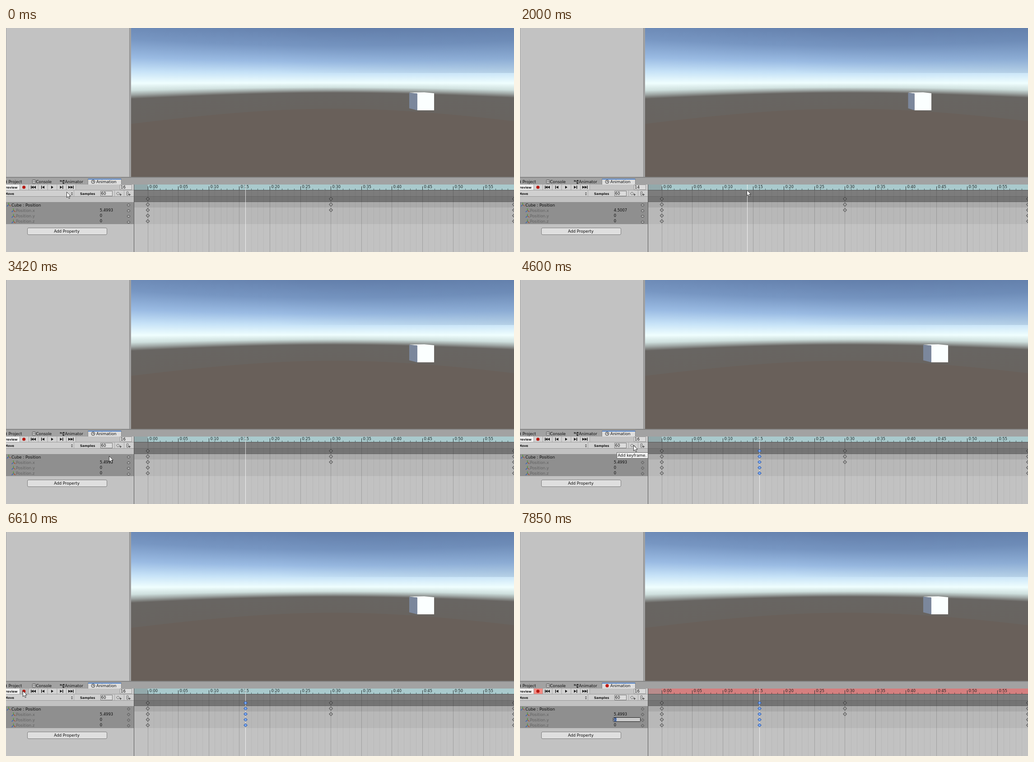
An HTML page with a canvas for the animation above (8 s loop, 1125 by 498 pixels).

```html
<!DOCTYPE html>
<html lang="en">
<head>
<meta charset="utf-8">
<title>Keyframe editor</title>
<style>
  html, body { margin: 0; width: 100%; height: 100%; overflow: hidden; background: #c2c2c2; }
  canvas { display: block; }
</style>
</head>
<body>
<canvas id="stage" width="1125" height="498"></canvas>
<script>
const W = 1125, H = 498, LOOP = 8000;
const stage = document.getElementById('stage');
let g = stage.getContext('2d');

const SANS = '"DejaVu Sans", sans-serif';
const ROWS = Array.from({ length: 5 }, (_, i) => 380 + 12.4 * i);
const frameX = f => 314 + 13.52 * f;

const TICK = 132;
const stepped = t => Math.floor((t + 20) / TICK) * TICK;

const DRAG = [1700, 2900];
const KEY_ADDED = 4480, TIP_ON = 4600, TIP_OFF = 5670;
const REC_PRESS = 6610, REC_ON = 6730, EDIT_ON = 7700, EDIT_SETTLED = 7850;
const POINTER_OFF = 7240;

// Stops of the pointer: time, x, y
const STOPS = [
  [0, 134, 364], [270, 242, 366], [420, 187, 380], [660, 554, 387], [810, 582, 363],
  [1200, 527, 360], [1700, 531, 360], [2120, 492, 360], [2360, 517, 360], [2780, 531, 360],
  [2930, 531, 360], [3420, 228, 391], [3690, 165, 356], [4080, 251, 367], [5000, 251, 367],
  [5520, 208, 396], [5670, 205, 401], [6330, 37, 353], [6610, 37, 353], [7130, 202, 405]
];

const smooth = u => u * u * (3 - 2 * u);

function pointerAt(t) {
  const i = STOPS.findIndex(s => s[0] > t);
  if (i < 1) return STOPS[STOPS.length - 1].slice(1);
  const [t0, x0, y0] = STOPS[i - 1], [t1, x1, y1] = STOPS[i];
  const u = smooth((t - t0) / (t1 - t0));
  return [x0 + (x1 - x0) * u, y0 + (y1 - y0) * u];
}

function rect(x, y, w, h, color) {
  g.fillStyle = color;
  g.fillRect(x, y, w, h);
}

function box(x, y, w, h, fill, edge, r = 0) {
  g.beginPath();
  g.roundRect(x + .5, y + .5, w - 1, h - 1, r);
  g.fillStyle = fill;
  g.fill();
  g.strokeStyle = edge;
  g.lineWidth = 1;
  g.stroke();
}

function poly(points, fill, edge, width = 1) {
  g.beginPath();
  points.forEach(([x, y]) => g.lineTo(x, y));
  g.closePath();
  if (fill) { g.fillStyle = fill; g.fill(); }
  if (edge) { g.strokeStyle = edge; g.lineWidth = width; g.stroke(); }
}

function line(x1, y1, x2, y2, color, width = 1) {
  g.beginPath();
  g.moveTo(x1, y1);
  g.lineTo(x2, y2);
  g.strokeStyle = color;
  g.lineWidth = width;
  g.stroke();
}

function dot(x, y, r, fill, edge) {
  g.beginPath();
  g.arc(x, y, r, 0, Math.PI * 2);
  g.fillStyle = fill;
  g.fill();
  if (edge) { g.strokeStyle = edge; g.lineWidth = 1; g.stroke(); }
}

function text(str, x, y, size = 8.75, color = '#0c0c0c', weight = '', align = 'left') {
  g.font = `${weight} ${size}px ${SANS}`;
  g.textAlign = align;
  g.fillStyle = color;
  g.fillText(str, x, y);
}

const mini = (str, x, y, align) => text(str, x, y, 7, '#111', 'bold', align);

function diamond(x, y, r, fill, edge) {
  poly([[x, y - r], [x + r, y], [x, y + r], [x - r, y]], fill, edge);
}

function gradient(x, y, stops) {
  const ramp = g.createLinearGradient(0, 0, x, y);
  stops.forEach(([at, color]) => ramp.addColorStop(at / (x || y), color));
  return ramp;
}

// Lines of equal elevation bend away from eye level, less so in the sky
function drawScene() {
  const level = 120, cx = 725.5, focal = 372, left = 277, depth = 340;
  const ramp = gradient(0, depth, [
    [0, '#6581ad'], [40, '#7796c2'], [75, '#9abbe3'], [100, '#c6e2f7'], [122, '#effefe'],
    [132, '#cfe0de'], [138, '#a0a8a6'], [144, '#686562'], [179, '#686460'],
    [179.8, '#69605a'], [depth, '#69605a']
  ]);
  g.save();
  g.beginPath();
  g.rect(left, 0, W - left, 331);
  g.clip();
  g.fillStyle = ramp;
  for (let x = left; x < W; x++) {
    const bend = Math.hypot(1, (x - cx) / focal);
    const halves = [[0, level, 1 + (bend - 1) * .35], [level, depth - level, bend]];
    for (const [y, h, s] of halves) {
      g.setTransform(1, 0, 0, s, 0, level * (1 - s));
      g.fillRect(x, y, 1, h);
    }
  }
  g.resetTransform();
  g.globalAlpha = .14;
  g.fillStyle = gradient(W, 0, [[600, 'rgba(50,75,115,0)'], [W, 'rgb(50,75,115)']]);
  g.fillRect(600, 0, W - 600, 100);
  g.restore();
}

function axes(x, y) {
  line(x, y, x, y - 4.5, '#4f9a2c', 1.4);
  line(x, y, x + 4.5, y + 3, '#a8502e', 1.4);
  line(x, y, x - 4, y + 3.5, '#2f62b8', 1.4);
}

function transportIcons() {
  const c = '#161616', y = 354;
  const tri = (x, dir) => poly([[x, y - 3.3], [x + 5 * dir, y], [x, y + 3.3]], c);
  const bar = x => rect(x, y - 3.5, 1.5, 7, c);
  bar(55); tri(61, -1); tri(66, -1);
  bar(78); tri(85, -1);
  tri(100, 1);
  tri(119.5, 1); bar(125);
  tri(138, 1); tri(143, 1); bar(148);
}

function drawTabs() {
  rect(0, 333, W, 15, '#a2a2a2');
  rect(182, 336, 73, 12, '#dedede');
  rect(182, 335, 73, 2, '#4c7fc9');
  line(181.5, 335, 181.5, 348, '#838383');
  line(255.5, 335, 255.5, 348, '#838383');
  rect(0, 339, 2, 6, '#555');
  text('Project', 5.5, 345.3);
  box(58, 337, 8, 9, '#ddd', '#444', 1);
  line(60, 340, 64.5, 340, '#444');
  line(60, 342.5, 64.5, 342.5, '#444');
  text('Console', 66.5, 345.3);
  line(121, 340, 128, 340, '#333');
  line(123, 340, 127, 344.5, '#333');
  rect(119.5, 338.5, 3, 3, '#333');
  rect(126, 338, 3.5, 3.5, '#333');
  rect(125.5, 343, 3.5, 3.5, '#333');
  text('Animator', 130.5, 345.3);
  text('Animation', 200, 345.3);
}

function drawToolbar() {
  rect(0, 348, 284, 13, '#d2d2d2');
  rect(0, 348, 30, 13, '#f1f1f1');
  rect(155, 348, 97, 13, '#c4c4c4');
  line(30.5, 348, 30.5, 361, '#a4a4a4');
  for (let x = 50.5; x < 160; x += 20.8) line(x, 348, x, 361, '#a4a4a4');
  line(0, 360.5, 284, 360.5, '#9a9a9a');
  mini('Preview', 25.5, 357, 'right');
  transportIcons();
  box(252, 348, 27, 12, '#dadada', '#989898');

  rect(0, 361, 284, 14, '#d0d0d0');
  for (const x of [150.5, 240.5, 261.5]) line(x, 361, x, 375, '#aaa');
  line(0, 374.5, 284, 374.5, '#989898');
  mini('Move', 18, 371, 'right');
  poly([[144, 367.5], [146, 365], [148, 367.5]], '#444');
  poly([[144, 369.5], [146, 372], [148, 369.5]], '#444');
  mini('Samples', 164, 371);
  box(209, 362, 27, 12, '#dcdcdc', '#7b7b7b');
  text('60', 210.5, 371, 8.5);
  diamond(248, 368, 3.4, '#ddd', '#555');
  box(267, 363, 4, 10, '#ddd', '#555', 1);
  for (const x of [253.5, 273.5]) {
    line(x - 2.5, 370.5, x + 2.5, 370.5, '#333');
    line(x, 368, x, 373, '#333');
  }
}

function drawProperties() {
  rect(0, 387, 284, 49, '#8f8f8f');
  axes(6, 393);
  text('Cube : Position', 12, 396.7);
  ['x', 'y', 'z'].forEach((axis, i) => {
    const y = 408.7 + i * 12.3;
    axes(16.5, y - 3);
    text('Position.' + axis, 22, y, 8.75, '#626262');
  });
  box(47, 444, 177, 16, '#dfdfdf', '#7c7c7c', 2.5);
  text('Add Property', 134.5, 455, 8.75, '#0c0c0c', '', 'center');
}

function drawSheet() {
  rect(284, 361, 841, 137, '#c2c2c2');
  rect(284, 387, 841, 49, '#b8b8b8');
  rect(284, 387, 841, 12, '#aaaaaa');
  rect(284, 361, 841, 13, '#7c7c7c');
  rect(284, 374, 841, 13, '#747474');
  line(284, 374.5, W, 374.5, '#686868');
  line(284, 386.5, W, 386.5, '#666');
  for (let f = 0; f < 60; f++) {
    const x = Math.floor(frameX(f)) + .5;
    line(x, 361, x, H, f % 5 ? 'rgba(0,0,0,.05)' : 'rgba(0,0,0,.18)');
  }
}

function drawRuler(recording) {
  rect(284, 348, 841, 12, recording ? '#d57f7f' : '#a9cacd');
  rect(284, 348, 30, 12, recording ? '#b98c8c' : '#93a9ab');
  line(284, 360.5, W, 360.5, '#555');
  for (let f = 0; f < 60; f++) {
    const x = Math.floor(frameX(f)) + .5, major = f % 5 === 0;
    line(x, major ? 352 : 357, x, 360, major ? '#2c3232' : 'rgba(20,30,30,.6)');
    if (major) text('0:' + String(f).padStart(2, '0'), x + 3, 356.2, 8.2, '#1c2222');
  }
}

function drawKeys() {
  ROWS.forEach((y, i) => {
    for (const f of [0, 30, 60]) {
      if (f === 30 && i > 2) continue;
      diamond(frameX(f), y, 3.9, i ? '#a4a4a4' : '#787878', '#2c2c2c');
    }
  });
}

function drawCube(pos) {
  const cx = 725.5;
  const front = x => cx + 37.1 * x, back = x => cx + 33.5 * x;
  const l = front(pos - .5), r = front(pos + .5), bl = back(pos - .5), br = back(pos + .5);
  poly([[bl, 143.5], [br, 143], [r, 145], [l, 146]], '#fbffff');
  poly([[bl, 144], [l, 145.5], [l, 183], [bl, 178.5]], '#7b879c');
  poly([[l, 145], [r, 145], [r, 183], [l, 183]], '#fbffff');
}

function drawPointer(x, y) {
  const shape = [[0, 0], [0, 12.5], [2.9, 9.9], [4.9, 14.6], [6.9, 13.8], [5, 9.2], [8.8, 9]];
  poly(shape.map(([px, py]) => [x + .5 + px, y + .5 + py]), '#fff', '#222', .9);
}

function drawPlayhead(frame, keyed) {
  const x = Math.floor(frameX(frame));
  rect(x, 348, 1, H - 348, 'rgba(255,255,255,.8)');
  if (!keyed) return;
  for (const y of ROWS) {
    diamond(x + .5, y, 3.9, '#6199f2', '#24488c');
    rect(x, y - 3, 1, 6, 'rgba(255,255,255,.35)');
  }
}

function drawRecord(t) {
  const recording = t >= REC_ON;
  if (t >= REC_PRESS) rect(31, 348, 19, 12, recording ? '#f28b84' : '#b9b9b9');
  dot(39.7, 354, 3.6, '#b81a12');
  if (recording) {
    dot(193, 341.7, 3.7, '#c01a14');
  } else {
    dot(193, 341.7, 3.9, '#d8d8d8', '#333');
    line(193, 339, 193, 342, '#333');
    line(193, 342, 195.5, 342, '#333');
  }
}

function drawValues(pos, keyed) {
  [+pos.toFixed(4), 0, 0].forEach((v, i) => text(String(v), 207.8, 408 + 12.2 * i, 8.4));
  for (const y of ROWS.slice(1)) {
    if (keyed) {
      diamond(271.5, y + 1, 3.1, '#a8a8a8', '#333');
      rect(271, y + .5, 1, 1, '#222');
    } else {
      box(268, Math.round(y) - 1, 7, 5, '#bdbdbd', '#3a3a3a', 2);
    }
  }
}

function drawEdit(settled) {
  box(206, 412, 61, 10, '#cacaca', '#1c1c1c', 1);
  rect(208, 413, 6, 8, '#6a90d8');
  text('0', 207.8, 420.2, 8.4);
  if (settled) return;
  line(210.5, 408, 210.5, 426, '#555');
  line(207, 407.5, 214, 407.5, '#555');
  line(207, 426.5, 214, 426.5, '#555');
}

// The unchanging part is drawn once
const base = document.createElement('canvas');
base.width = W;
base.height = H;
const screen = g;
g = base.getContext('2d');
rect(0, 0, W, H, '#c2c2c2');
rect(0, 0, 1, 331, '#a6a6a6');
rect(273, 0, 4, 331, '#a2a2a2');
rect(273, 0, 1, 331, '#8a8a8a');
drawScene();
rect(0, 331, W, 2, '#858585');
drawTabs();
drawToolbar();
drawProperties();
drawSheet();
drawKeys();
g = screen;

function draw(t) {
  const now = stepped(t);
  const [px, py] = pointerAt(now);
  const dragging = now >= DRAG[0] && now < DRAG[1];
  const frame = dragging ? Math.round((px - 314) / 13.52) : 16;
  const pos = 10 * smooth(frame / 30);
  const keyed = t >= KEY_ADDED;

  g.drawImage(base, 0, 0);
  drawCube(pos);
  drawRuler(t >= REC_ON);
  drawRecord(t);
  text(String(frame), 254, 357, 8.6);
  drawValues(pos, keyed);
  drawPlayhead(frame, keyed);
  if (t >= TIP_ON && t < TIP_OFF) {
    box(214, 383, 70, 14, '#f2f2f2', '#6a6a6a');
    text('Add keyframe.', 216.5, 393.4);
  }
  if (t >= EDIT_ON) drawEdit(t >= EDIT_SETTLED);
  rect(283, 348, 1, H - 348, '#555');
  if (t < POINTER_OFF) drawPointer(Math.round(px), Math.round(py));
}

const start = performance.now();
function tick(now) {
  draw(Math.max(0, now - start) % LOOP);
  requestAnimationFrame(tick);
}
draw(0);
requestAnimationFrame(tick);
</script>
</body>
</html>
```
